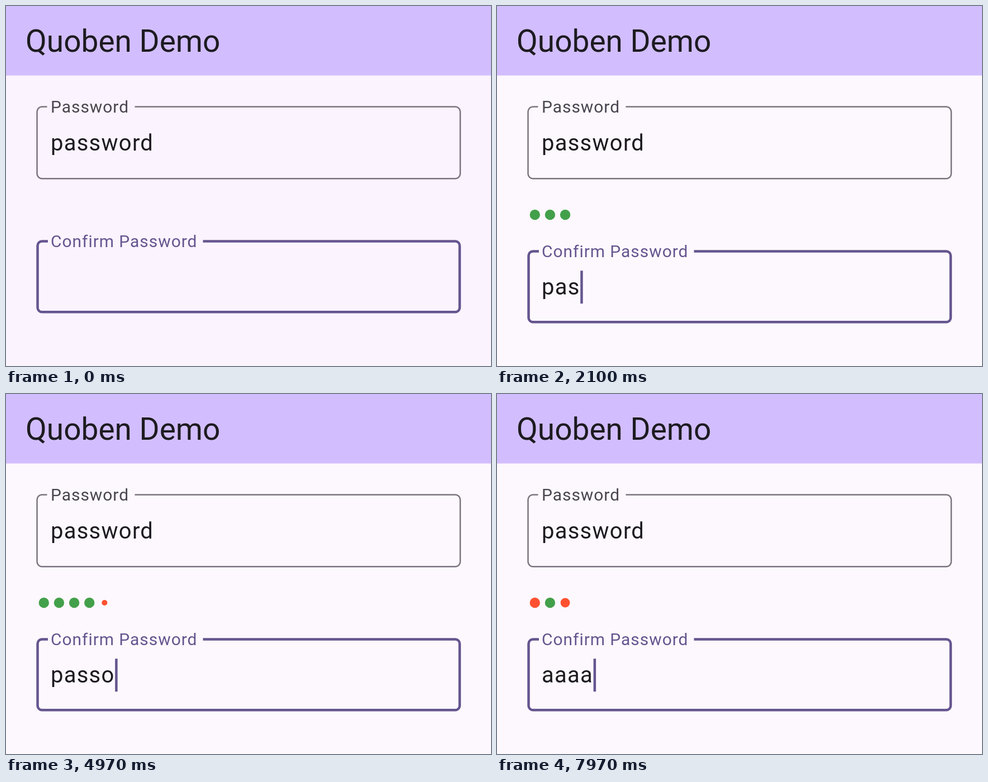
Write an HTML page that moves like this. It is 868 px wide and 645 px high and loops after 8000 ms.

```html
<!DOCTYPE html>
<html lang="en">
<head>
<meta charset="utf-8">
<title>Password confirmation</title>
<style>
  html, body { margin: 0; width: 100%; height: 100%; overflow: hidden; }
  svg { display: block; width: 100vw; height: 100vh; font-family: Roboto, sans-serif; }
  text { white-space: pre; fill: #1d1b20; }
  .title { font-size: 55px; }
  .value { font-size: 40px; letter-spacing: 1.25px; }
  .label { font-size: 30px; letter-spacing: .94px; fill: #49454f; }
  .outline { fill: none; stroke: #79747e; stroke-width: 2.5; }
  .focused .outline { stroke: #65558f; stroke-width: 4.5; }
  .focused .label, #caret { fill: #65558f; }
</style>
</head>
<body>
<svg viewBox="0 0 868 645">
  <rect id="page" width="868" height="645"/>
  <rect width="868" height="124.5" fill="#d2beff"/>
  <text class="title" x="35" y="82">Quoben Demo</text>
  <g transform="translate(0 179.2)">
    <path class="outline" id="passwordOutline"/>
    <text class="label" x="80" y="11.8">Password</text>
    <text class="value" x="80" y="79.5">password</text>
  </g>
  <g id="dots"></g>
  <g id="confirm" class="focused">
    <path class="outline" id="confirmOutline"/>
    <text class="label" x="80" y="12.8">Confirm Password</text>
    <text class="value" id="typed" x="80" y="79.8"></text>
    <rect id="caret" y="37" width="4.5" height="59"/>
  </g>
</svg>
<script>
const LOOP = 8000, DOT_GROW = 220, BLINK = 500;
const PASSWORD = 'password';
const $ = id => document.getElementById(id);

// Rounded box, 760 x 131.3, open at the top where the label sits.
function outline(stroke, gapStart, gapEnd) {
  const h = stroke / 2, left = 54.3 + h, right = 814.2 - h, top = h, bottom = 131.3 - h, r = 10 - h;
  const corner = (x, y) => `A${r} ${r} 0 0 1 ${x} ${y}`;
  return `M${gapEnd} ${top}H${right - r}${corner(right, top + r)}V${bottom - r}${corner(right - r, bottom)}` +
    `H${left + r}${corner(left, bottom - r)}V${top + r}${corner(left + r, top)}H${gapStart}`;
}
$('passwordOutline').setAttribute('d', outline(2.5, 73.5, 230.5));
$('confirmOutline').setAttribute('d', outline(4.5, 75, 352.5));

const dots = [...PASSWORD].map((_, i) => {
  const dot = document.createElementNS('http://www.w3.org/2000/svg', 'circle');
  dot.setAttribute('cx', 67.8 + i * 27.15);
  dot.setAttribute('cy', 374);
  $('dots').append(dot);
  return dot;
});

// Every keystroke becomes an edit: its time, the text, and when each letter's dot was born.
const edits = [{ time: -520, text: '', births: [] }];
function edit(time, text) {
  const { births } = edits.at(-1);
  edits.push({ time, text, births: [...text].map((_, i) => births[i] ?? time) });
}
function type(start, step, letters) {
  [...letters].forEach((letter, i) => edit(start + i * step, edits.at(-1).text + letter));
}
function erase(start, step, count) {
  for (let i = 0; i < count; i++) edit(start + i * step, edits.at(-1).text.slice(0, -1));
}
type(1390, 230, 'pas');
type(2120, 230, 'sword');
erase(4300, 120, 4);
type(4850, 200, 'owrd');
erase(6140, 65, 8);
type(7380, 195, 'aaaa');

function draw(now) {
  const t = now % LOOP;
  const { time, text, births } = edits.findLast(e => e.time <= t);

  $('page').setAttribute('fill', t < 30 ? '#fbf3fe' : '#fdf8fd');
  $('confirm').setAttribute('transform', `translate(0 ${text ? 437.2 : 419.2})`);
  if ($('typed').textContent !== text) $('typed').textContent = text;

  const width = text ? $('typed').getComputedTextLength() : 0;
  $('caret').setAttribute('x', 80.6 + width);
  $('caret').setAttribute('visibility', (t - time) % (2 * BLINK) < BLINK ? 'visible' : 'hidden');

  dots.forEach((dot, i) => {
    const scale = i < text.length ? Math.min(1, (t - births[i]) / DOT_GROW) : 0;
    dot.setAttribute('r', 9.2 * scale);
    dot.setAttribute('fill', text[i] === PASSWORD[i] ? '#43a04a' : '#ff5130');
  });
}

const start = performance.now();
function tick() {
  draw(performance.now() - start);
  requestAnimationFrame(tick);
}
draw(0);
requestAnimationFrame(tick);
</script>
</body>
</html>
```
